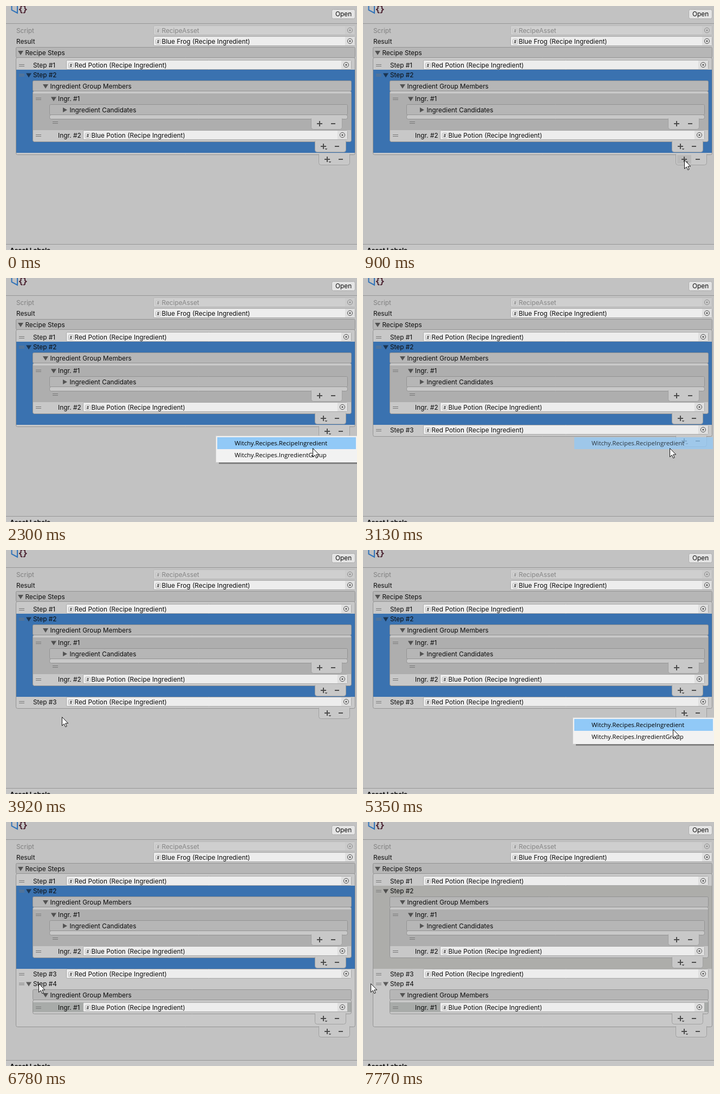
Recreate the animation shown at these times as an HTML page with a canvas. Size 648 by 452 pixels, loop 7.8 s.

```html
<!DOCTYPE html>
<html lang="en">
<head>
<meta charset="utf-8">
<title>Recipe inspector</title>
<style>
html, body { margin: 0; width: 100%; height: 100%; overflow: hidden; background: #c2c2c2; }
canvas { display: block; }
</style>
</head>
<body>
<canvas id="stage" width="648" height="452"></canvas>
<script>
const ctx = document.getElementById('stage').getContext('2d');
const LOOP = 7800, BLUR_TIME = 7010, FADE = 340;
const INK = '#0c0c0c', EDGE = '#939393', LIST = '#c8c8c8', HEAD = '#b6b6b6', ICON = '#4c4c4c';
const UI_FONT = '11.85px Inter, sans-serif';
const MENU_FONT = '11.4px "Open Sans", sans-serif';
const ITEMS = ['Witchy.Recipes.RecipeIngredient', 'Witchy.Recipes.IngredientGroup'];

// Layout: member heights of each step; a step without members is a plain row
const ROW = 18, NESTED = 68, FIRST_STEP = 100;
const STEPS = [[], [NESTED, ROW], [], [ROW]];
const sum = list => list.reduce((a, b) => a + b, 0);
const stepHeight = members => members.length ? sum(members) + 68 : ROW;
const listBottom = count => FIRST_STEP + sum(STEPS.slice(0, count).map(stepHeight)) + 3;

const MENUS = [
  { open: 1310, click: 3040, pick: 0, y: listBottom(2) + 17 },
  { open: 5100, click: 5830, pick: 1, y: listBottom(3) + 17 }
];

// Pointer moves: start and end time, then where it arrives
const START = { x: 572, y: 454 };
const MOVES = [
  [80, 900, 593, 285],
  [1740, 2000, 582, 366],
  [2000, 2300, 566, 315],
  [3200, 3820, 75, 310],
  [3845, 4430, 680, 290],
  [4690, 4890, 595, 300],
  [5070, 5350, 572, 332],
  [5350, 5550, 566, 350],
  [6050, 6600, 70, 320],
  [6650, 6780, 60, 299],
  [7390, 7540, 14, 299]
];

function pointerAt(t) {
  let { x, y } = START;
  for (const [from, to, toX, toY] of MOVES) {
    const k = Math.min(1, Math.max(0, (t - from) / (to - from)));
    const eased = k * k * (3 - 2 * k);
    x += (toX - x) * eased;
    y += (toY - y) * eased;
  }
  return { x: Math.round(x), y: Math.round(y) };
}

const inside = (p, x, y, w, h) => p.x >= x && p.x < x + w && p.y >= y && p.y < y + h;

function rect(x, y, w, h, color) {
  ctx.fillStyle = color;
  ctx.fillRect(x, y, w, h);
}

function box(x, y, w, h, fill, edge, radius = 2) {
  ctx.beginPath();
  ctx.roundRect(x + .5, y + .5, w - 1, h - 1, radius);
  ctx.fillStyle = fill;
  ctx.fill();
  ctx.strokeStyle = edge;
  ctx.lineWidth = 1;
  ctx.stroke();
}

function text(str, x, y, color = INK, font = UI_FONT) {
  ctx.font = font;
  ctx.fillStyle = color;
  ctx.fillText(str, x, y);
}

function shape(d, x, y, fill, stroke, width = 1) {
  const path = new Path2D(d);
  ctx.save();
  ctx.translate(x, y);
  if (fill) { ctx.fillStyle = fill; ctx.fill(path); }
  if (stroke) { ctx.strokeStyle = stroke; ctx.lineWidth = width; ctx.stroke(path); }
  ctx.restore();
}

function arrow(x, y, open = true) {
  shape(open ? 'M-5 -3.5H5L0 4.5Z' : 'M-4 -4.5V4.5L4 0Z', x, y, 'rgba(0,0,0,.54)');
}

function handle(x, y) {
  rect(x, y, 10, 1, '#777');
  rect(x, y + 3, 10, 1, '#777');
}

function field(x, y, right, value, pointer, disabled) {
  const hover = inside(pointer, x, y, right - x, ROW);
  const dot = disabled ? '#8c8c8c' : '#505050';
  box(x, y, right - x, ROW, disabled ? '#cfcfcf' : '#ededed', hover ? '#505050' : disabled ? '#b8b8b8' : '#a9a9a9');
  rect(right - 19, y + 1, 18, 16, disabled ? '#cbcbcb' : '#dfdfdf');
  box(x + 4, y + 5, 10, 10, disabled ? '#d8d8d8' : '#f8f8f8', disabled ? '#bbb' : '#aaa');
  text('#', x + 6.5, y + 13, disabled ? '#888' : '#333', 'bold 7.5px Inter, sans-serif');
  text(value, x + 15.5, y + 14, disabled ? '#858585' : INK);
  ctx.strokeStyle = ctx.fillStyle = dot;
  for (const r of [4.6, 1.6]) {
    ctx.beginPath();
    ctx.arc(right - 10, y + 9, r, 0, 7);
    r > 2 ? ctx.stroke() : ctx.fill();
  }
}

function footer(x, y, popup, pointer) {
  ctx.beginPath();
  ctx.roundRect(x + .5, y - .5, 57, 20, [0, 0, 4, 4]);
  ctx.fillStyle = LIST;
  ctx.fill();
  ctx.strokeStyle = '#a0a0a0';
  ctx.lineWidth = 1;
  ctx.stroke();
  rect(x + 1, y - 1, 56, 2, LIST);
  if (inside(pointer, x + 3, y, 26, 17)) rect(x + 3, y + 1, 26, 16, '#bababa');
  rect(x + 11, y + 8, 10, 2, ICON);
  rect(x + 15, y + 4, 2, 10, ICON);
  if (popup) shape('M0 0H5L2.5 2.5Z', x + 18.5, y + 13, ICON);
  rect(x + 37, y + 8, 8, 2, ICON);
}

function list(x, y, right, bottom, title, titleX, pointer, open = true) {
  box(x, y + 19, right - x, bottom - y - 18, LIST, EDGE, 3);
  box(x, y, right - x, 20, HEAD, EDGE);
  arrow(titleX - 8, y + 10.5, open);
  text(title, titleX + .4, y + 15);
  footer(right - 68, bottom, open, pointer);
}

function potionRow(label, y, isStep, pointer) {
  handle(isStep ? 24 : 55, y + 8);
  text(label, isStep ? 50 : 96, y + 14);
  field(isStep ? 111 : 142, y, isStep ? 638 : 631, `${isStep ? 'Red' : 'Blue'} Potion (Recipe Ingredient)`, pointer);
}

function nestedMember(label, y, pointer) {
  rect(50, y, 587, NESTED, '#aeaeae');
  handle(55, y + 8);
  arrow(88, y + 10);
  text(label, 96, y + 14);
  list(80, y + 20, 631, y + 47, 'Ingredient Candidates', 117, pointer, false);
  handle(86, y + 52);
}

function groupStep(label, y, members, pointer) {
  handle(24, y + 8);
  arrow(42, y + 10);
  text(label, 50, y + 14);
  let rowY = y + 44;
  list(49, y + 20, 638, rowY + sum(members) + 3, 'Ingredient Group Members', 81, pointer);
  members.forEach((height, i) => {
    const name = 'Ingr. #' + (i + 1);
    if (height === NESTED) nestedMember(name, rowY, pointer);
    else {
      if (members.length === 1) rect(50, rowY, 587, ROW, '#a8aba9');
      potionRow(name, rowY, false, pointer);
    }
    rowY += height;
  });
}

function recipeSteps(t, pointer) {
  const count = 2 + MENUS.filter(m => t >= m.click + 70).length;
  list(18, 76, 645, listBottom(count), 'Recipe Steps', 35, pointer);
  let y = FIRST_STEP;
  STEPS.slice(0, count).forEach((members, i) => {
    const name = 'Step #' + (i + 1), height = stepHeight(members);
    if (i === 1) rect(19, y, 625, height, t < BLUR_TIME ? '#3a72b0' : '#adadaa');
    if (members.length) groupStep(name, y, members, pointer);
    else potionRow(name, y, true, pointer);
    y += height;
  });
}

function windowFrame(pointer) {
  rect(0, 0, 648, 452, '#c2c2c2');
  rect(0, 32, 648, 1, '#969696');
  shape('M10.5 -2V7.5L21 13V-2', 0, 0, null, '#3173b8', 2);
  shape('M30.5 0H29Q27.5 0 27.5 2V4.5L25 6.5L27.5 8.5V11Q27.5 12.5 29 12.5H30.5'
    + 'M32 0H33.5Q35 0 35 2V4.5L37.5 6.5L35 8.5V11Q35 12.5 33.5 12.5H32', 0, 0, null, '#461c2a', 1.9);
  box(601, 6, 44, 18, '#e4e4e4', '#adadad', 3);
  text('Open', 608, 19);
  text('Script', 19, 50, '#808080');
  field(272, 36, 645, 'RecipeAsset', pointer, true);
  text('Result', 19, 70);
  field(272, 56, 645, 'Blue Frog (Recipe Ingredient)', pointer);
  rect(0, 441, 648, 1, '#969696');
  rect(0, 442, 648, 10, '#c6c6c6');
  text('Asset Labels', 7, 457, INK, 'bold 12px Inter, sans-serif');
}

function menuItem(i, y, lit) {
  if (lit) rect(390, y + 3 + i * 22, 256, 22, '#91c9f7');
  text(ITEMS[i], 422, y + 18 + i * 22, '#000', MENU_FONT);
}

function drawMenu(m, t, pointer) {
  if (t < m.open || t > m.click + FADE) return;
  ctx.save();
  if (t < m.click) {
    ctx.globalAlpha = Math.min(1, (t - m.open) / 200);
    for (let i = 0; i < 3; i++) rect(393, m.y + 50 + i, 255, 1, `rgba(0,0,0,${.5 - i * .18})`);
    box(387, m.y, 262, 50, '#f2f2f2', '#d0d0d0', 0);
    const row = Math.floor((pointer.y - m.y - 3) / 22);
    ITEMS.forEach((_, i) => menuItem(i, m.y, i === row));
  } else {
    // The chosen item lingers and fades out
    ctx.globalAlpha = 1 - (t - m.click) / FADE;
    menuItem(m.pick, m.y, true);
  }
  ctx.restore();
}

function draw(now) {
  const t = Math.max(0, now) % LOOP;
  const pointer = pointerAt(t);
  windowFrame(pointer);
  recipeSteps(t, pointer);
  MENUS.forEach(m => drawMenu(m, t, pointer));
  shape('M.5 .5V16.5L4.2 13L6.8 18.7L9.2 17.6L6.7 12H11.8Z', pointer.x, pointer.y, '#fff', '#111');
  requestAnimationFrame(draw);
}
requestAnimationFrame(draw);
</script>
</body>
</html>
```
